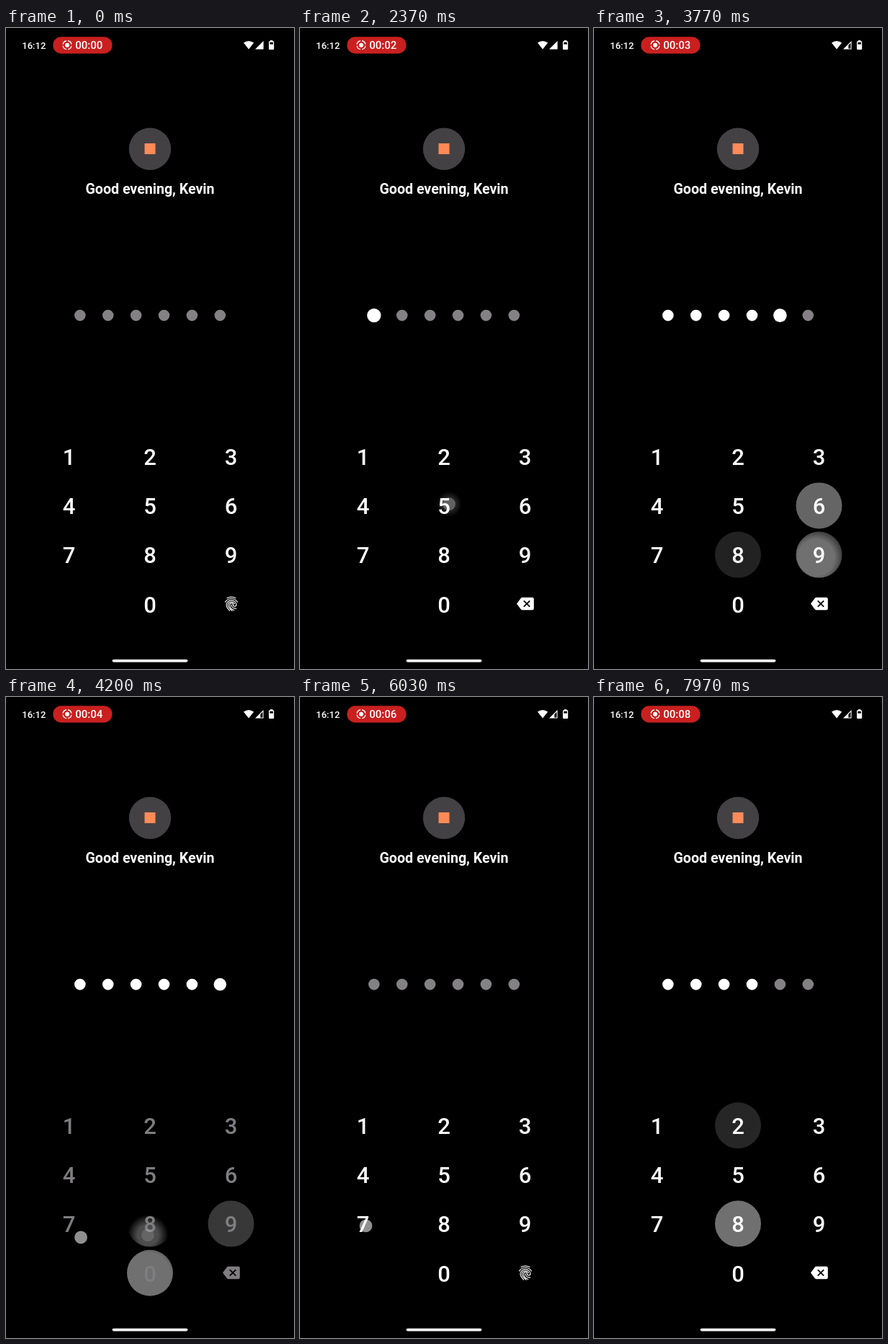
An HTML page that plays this animation: 400x889 px, repeating every 8000 ms.

```html
<!DOCTYPE html>
<html lang="en">
<head>
<meta charset="utf-8">
<title>PIN entry</title>
<style>
  html, body { margin: 0; width: 100%; height: 100%; overflow: hidden; background: #000; }
  svg { display: block; width: 100vw; height: 100vh; }
  text { font-family: Roboto, sans-serif; font-weight: 500; fill: #fff; }
  .key text { font-size: 31px; text-anchor: middle; fill: inherit; }
</style>
</head>
<body>
<svg id="stage" viewBox="0 0 400 889" fill="#fff">
  <defs>
    <radialGradient id="soft">
      <stop offset=".5" stop-color="#fff"/>
      <stop offset="1" stop-color="#fff" stop-opacity="0"/>
    </radialGradient>
  </defs>

  <text x="22.3" y="28.5" font-size="13">16:12</text>
  <rect x="65.3" y="12.2" width="82.2" height="23.3" rx="11.6" fill="#c9201f"/>
  <circle cx="85" cy="23.7" r="3"/>
  <circle cx="85" cy="23.7" r="6" fill="none" stroke="#fff" stroke-width="1.4"
          pathLength="40" stroke-dasharray="7.6 2.4" stroke-dashoffset="-1.2"/>
  <text id="timer" x="96.3" y="28.6" font-size="15" font-weight="400"></text>
  <path d="M330 20.6Q337 15.2 344.2 20.6L337.1 29.6Z"/>
  <path id="signalFull" d="M346 29.6L357.6 18V29.6Z"/>
  <path id="signalWeak" d="M346 29.6L353.4 22.2V29.6ZM353 22.6L357.6 18V29.6H353V28.5H356.5V20.7L353 24.2Z"/>
  <path d="M367 17H370.3V18.3H371Q372.2 18.3 372.2 19.5V29Q372.2 30.1 371 30.1H366.2Q365 30.1 365 29V19.5Q365 18.3 366.2 18.3H367Z"/>
  <rect x="366.3" y="19.8" width="4.6" height="2.8" fill="#000"/>

  <circle cx="200" cy="167.7" r="29.2" fill="#444144"/>
  <rect x="192.5" y="160" width="15" height="15" fill="#ff8a57"/>
  <text x="200" y="229.8" font-size="19.6" style="font-weight:700" text-anchor="middle">Good evening, Kevin</text>

  <g id="dots"></g>
  <g id="ripples"></g>
  <g id="keys" class="key"></g>
  <g id="backspace">
    <path d="M301 798.5L306.6 791Q307.5 789.8 309 789.8H322.6Q324.8 789.8 324.8 792V805Q324.8 807.2 322.6 807.2H309Q307.5 807.2 306.6 806Z"/>
    <path d="M310.8 794.3l8.4 8.4m0-8.4l-8.4 8.4" stroke="#000" stroke-width="1.9"/>
  </g>
  <g id="fingerprint" transform="translate(301 786.5)" fill="none" stroke="#fff" stroke-width="1.15" stroke-linecap="round">
    <path d="M6 4.1Q12 1 18 4.1M3.5 9.6C7.5 3.4 16.5 3.4 20.5 9.6"/>
    <path d="M9.6 21.6C6 18 5 16 5 13.3 5 10 8 7.3 12 7.3S19 10 19 13.3c0 3.2-4.6 3.2-4.6 0 0-3.2-4.8-3.2-4.8 0 0 4 2.6 6.7 6.2 7.7"/>
    <path d="M12 13.3c0 3.5 3 5.7 6.8 5.2M13.2 21.8C9 19 7.3 16.6 7.3 13.3c0-4.8 7.7-4.9 9.2-1"/>
  </g>
  <g id="touches"></g>
  <rect x="147.6" y="875.8" width="104.8" height="3.6" rx="1.8"/>
</svg>

<script>
const LOOP = 8000, REJECT = 4710, SHAKE = 400, WEAK_SIGNAL = 3070;
const $ = id => document.getElementById(id);
const clamp = v => Math.max(0, Math.min(1, v));

function add(parent, tag, attrs) {
  const el = document.createElementNS('http://www.w3.org/2000/svg', tag);
  set(el, attrs);
  return parent.appendChild(el);
}
function set(el, attrs) {
  for (const name in attrs) el.setAttribute(name, attrs[name]);
}
function show(id, visible) {
  $(id).style.display = visible ? '' : 'none';
}

function keyCentre(digit) {
  const slot = digit ? digit - 1 : 10;
  return { x: 87.5 + 112.5 * (slot % 3), y: 594 + 68.2 * Math.floor(slot / 3) };
}

// [release time, digit, finger offset x, y]; presses on the locked pad add no dot
const accepted = [
  [2300, 5, 7, -2], [2570, 2, 5, 4], [3130, 8, 4, 3],
  [3380, 6, 0, -9], [3640, 9, -4, 4], [4050, 0, -2, 3],
  [6080, 7, 4, 3], [6390, 5, 3, 2], [7343, 2, 3, 3], [7730, 8, 2, 2]
];
const ignored = [[4110, 8, -3, 16], [4220, 7, 16.5, 19]];
const LOCKED_RIPPLE_END = 4200;

for (let digit = 0; digit < 10; digit++) {
  const { x, y } = keyCentre(digit);
  add($('keys'), 'text', { x, y: y + 12 }).textContent = digit;
  const clip = add(document.querySelector('defs'), 'clipPath', { id: 'key' + digit });
  add(clip, 'circle', { cx: x, cy: y + 0.2, r: 32 });
}

const presses = [...accepted, ...ignored].map(([time, digit, dx, dy]) => {
  const key = keyCentre(digit), cx = key.x + dx, cy = key.y + dy;
  const clipped = add($('ripples'), 'g', { 'clip-path': `url(#key${digit})` });
  return {
    time,
    ripples: time < LOCKED_RIPPLE_END || time > REJECT,
    ripple: add(clipped, 'circle', { cx, cy, fill: 'url(#soft)' }),
    touch: add($('touches'), 'circle', { cx, cy, r: 8.6, 'fill-opacity': .56, stroke: '#fff', 'stroke-opacity': .25 })
  };
});

const dots = Array.from({ length: 6 }, (_, i) =>
  add($('dots'), 'circle', { cx: 102.8 + 38.9 * i, cy: 398.6 }));

function drawPress({ time, ripples, ripple, touch }, t) {
  const age = t - time;
  set(touch, { opacity: age < -80 ? 0 : 1 - clamp((age - 30) / 80) });
  const spread = age - 50;
  const visible = ripples && spread > 0;
  set(ripple, {
    r: visible ? 6 + .55 * spread : 0,
    opacity: visible ? .44 * clamp(spread / 60) * (1 - clamp((spread - 300) / 420)) : 0
  });
}

function draw(t) {
  const entered = accepted.map(p => p[0])
    .filter(time => time <= t && (t < REJECT || time > REJECT));
  const locked = entered.length === 6;

  $('timer').textContent = '00:0' + Math.floor((t + 100) / 1000);
  show('signalFull', t < WEAK_SIGNAL);
  show('signalWeak', t >= WEAK_SIGNAL);
  show('fingerprint', !entered.length);
  show('backspace', entered.length);
  const keyColour = locked ? '#7f7d80' : '#fff';
  set($('keys'), { fill: keyColour });
  set($('backspace'), { fill: keyColour });

  dots.forEach((dot, i) => {
    const filled = i < entered.length;
    const pulse = filled ? Math.sin(Math.PI * clamp((t - entered[i]) / 180)) : 0;
    set(dot, { r: 7.8 + 2 * pulse, fill: filled ? '#fff' : '#848184' });
  });
  const since = t - REJECT;
  const shake = since > 0 && since < SHAKE
    ? -16 * Math.sin(2 * Math.PI * since / 140) * (1 - since / SHAKE) : 0;
  set($('dots'), { transform: `translate(${shake} 0)` });

  presses.forEach(press => drawPress(press, t));
}

const start = performance.now();
function tick() {
  draw((performance.now() - start) % LOOP);
  requestAnimationFrame(tick);
}
tick();
</script>
</body>
</html>
```
